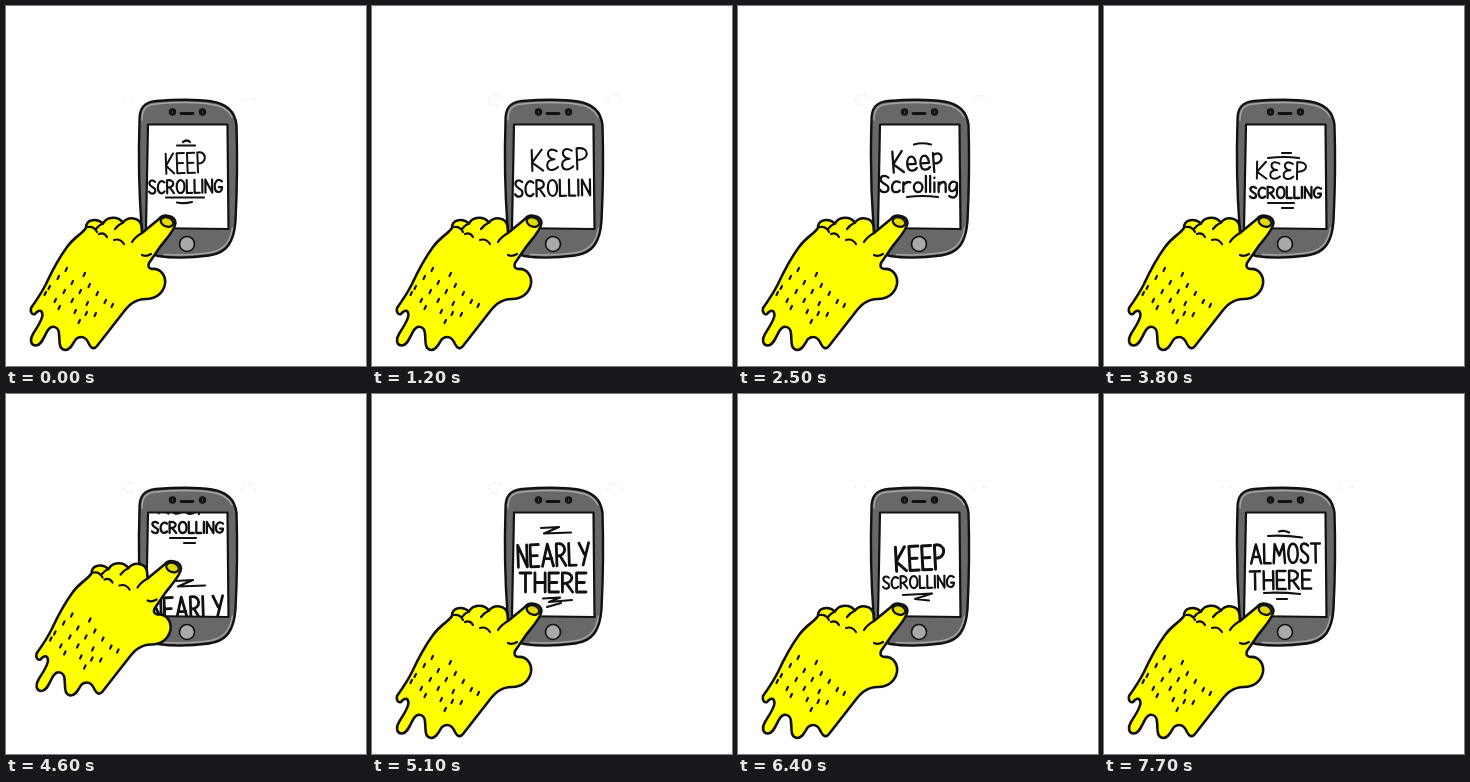
Animation of 360 by 360 pixels, one loop 8000 ms. Source, as an HTML page:

```html
<!DOCTYPE html>
<html lang="en">
<head>
<meta charset="utf-8">
<title>Keep scrolling</title>
<style>
  html, body { margin: 0; width: 100%; height: 100%; overflow: hidden; background: #fff; }
  svg { display: block; width: 100%; height: 100%; }
  .ink { fill: none; stroke: #111; stroke-width: 2.2; stroke-linecap: round; stroke-linejoin: round; }
  .ink path { vector-effect: non-scaling-stroke; }
  .specks { fill: none; stroke: #d0d0d0; stroke-width: 1; stroke-dasharray: 1 2; }
</style>
</head>
<body>
<svg viewBox="0 0 360 360" role="img" aria-label="A yellow hand scrolling on a phone">
  <defs>
    <clipPath id="glass"><path d="M142 118.500L221.500 118.500L222.500 223L140 222Z"/></clipPath>
  </defs>

  <g class="specks">
    <path id="arcs" d="M129 91A6.500 5 0 1 0 127 98M236 95A6.500 5 0 1 1 248 97"/>
    <path id="bits" d="M117 93h3M126 93h3M236 94h3M245 93h4"/>
  </g>

  <g class="ink">
    <path fill="#686868" stroke-width="2.400" d="M133.500 115C133 102 138 96 150 95C170 93.500 193 93.500 206 95.500C222 98 229 106 230.500 119C231.500 150 231 185 229.500 215C228 236 221 247 203 249.500C185 252 165 252 152 250C141 247 136 236 135.500 220C132.500 180 132.500 145 133.500 115Z"/>
    <path stroke="#a9a5a5" stroke-width="1.400" d="M136 114C136 103 140 99 150 98C172 96 192 96 206 98.500C217 100 223 104 226 111M158 248.500C173 249.500 187 249 202 247C216 245 224 238 226.500 222"/>
    <path fill="#fff" d="M142 118.500L221.500 118.500L222.500 223L140 222Z"/>
    <path stroke-width="2.800" d="M175 107.500h12"/>
    <circle cx="166.500" cy="106" r="2.600" fill="#999"/>
    <circle cx="196.500" cy="106" r="2.600" fill="#999"/>
    <circle cx="166.500" cy="106" r=".6"/>
    <circle cx="196.500" cy="106" r=".6"/>
    <circle cx="181" cy="238" r="7.500" fill="#a9a9a9" stroke-width="1.600"/>
  </g>

  <g clip-path="url(#glass)"><g id="feed" class="ink"></g></g>

  <g id="hand" class="ink">
    <path fill="#ff0" stroke-width="2.600" d="M80 222C80 213 91 212 97 217.500C101 210 112 210 117 216.500C122 210 134 211 135.500 220L136 227
      L153 213C157 207.500 169 209 169.500 217C169 224 160 233 154 241L143 257Q141 262 146 263C155 262 160 270 159 278C157 288 149 293 140 293
      C128 293 122 300 116 308L91 340C88 344 85 342 83 338C80 331 75 329 70 333C67 337 65 344 59 344
      C52 343 54 335 53 328C53 321 46 318 42 324C38 330 36 339 30 339.500C24 339 24 333 27 328C31 321 36 315 36.500 309C36 303 32 304 29 308
      C26 309 24 306 25 302C30 295 36 286 40 278C46 265 53 252 61 241C68 231 75 229 80 222Z"/>
    <path d="M97 217.500Q93 219 90 223M117 216.500Q112 219 109 223M136 227Q129 231 126 236M82 221Q88 220 91 226M93 228Q98 226 101 231M108 234Q114 232 118 238M136 249Q140 251 145 248"/>
    <ellipse cx="161" cy="216" rx="6.500" ry="4.600" fill="#e3d900" transform="rotate(20 161 216)"/>
    <path id="hairs"/>
  </g>
</svg>
<script>
const $ = id => document.getElementById(id);

// Pen strokes in a box ten units high: [width, path]. "3" is a curly E.
const glyphs = {
  A: [8, 'M0 10L4 0L8 10M1.5 6.500H7'],
  C: [6.5, 'M6.500 1.500C3 -1 0 2 0 5.500C0 10 4 11 6.500 8.500'],
  E: [6, 'M6 0H0V10H6M0 5H5'],
  3: [6.5, 'M6 1C2 -1 0 1 1 3.200Q2 4.800 4.500 4.800Q0 5 0 7.500C0 10.500 4 10.500 6.500 8.500'],
  G: [7, 'M7 1.500C3 -1.500 0 2 0 5.500C0 11 7 11 7 6H4'],
  H: [6.5, 'M0 0V10M6.500 0V10M0 5H6.500'],
  I: [.5, 'M0 0V10'],
  K: [6.5, 'M0 0V10M6 0L0 6L6.500 10'],
  L: [5, 'M0 0V10H5'],
  M: [9, 'M0 10L1 0L4.500 6L8 0L9 10'],
  N: [6.5, 'M0 10V0L6.500 10V0'],
  O: [7.5, 'M4 0C-1 0 -1 10 4 10C9 10 9 0 4 0Z'],
  P: [6, 'M0 10V0C8 -1 8 6 0 5.500'],
  R: [6.5, 'M0 10V0C8 -1 8 6 0 5.500M2.500 5.500L6.500 10'],
  S: [6, 'M6 1C3 -1 0 0 .5 2.500C1 5 6 5 6 7.500C6 11 1 10.500 0 8.500'],
  T: [7, 'M0 0H7M3.500 0V10'],
  Y: [7, 'M0 0L3.500 5M7 0L2.500 10'],
  e: [6, 'M.5 6.500H5.500C5.500 1.500 0 2 0 6.500C0 10.500 4.500 10 6 8.500'],
  p: [5.5, 'M0 2V11M0 3C6 0 8 7.500 0 7'],
  c: [5.5, 'M5.500 4C2 2 0 5 0 7C0 11 4 10.500 5.500 9'],
  r: [5, 'M0 4V10M0 6Q2 3 5 4'],
  o: [6, 'M3 4C-1 4 -1 10 3 10C7 10 7 4 3 4Z'],
  l: [.5, 'M0 0V10'],
  i: [.5, 'M0 4V10M0 1V1.300'],
  n: [5, 'M0 4V10M0 6C2 3 5 3 5 6V10'],
  g: [5.5, 'M5.500 4.500C2 2 0 5 0 7C0 11 5 10 5.500 5V10C5.500 14 2 14 0 12.500']
};

// Words: [letters, left, right, top, bottom, pen, tilt]
const screens = [
  { words: [['KEEP', 160, 199, 147, 167, 2, -2], ['SCROLLING', 143, 216, 174, 187, 2.2, -1]],
    lines: 'M171 139.500H189M177 136Q181 133 184 136M160 191.500H198M171 196.500Q178 198 186 196' },
  { words: [['K33P', 160, 215, 143, 164, 2.1, -2], ['SCROLLIN', 143, 218, 174, 190, 2.2, -1]], lines: '' },
  { words: [['Keep', 155, 204, 144, 165, 2.3, -4], ['Scrolling', 142, 219, 170, 186, 2.3, 0]],
    lines: 'M176 138.500Q184 136 193 138.500M169 191Q184 189 200 191' },
  { words: [['K33P', 153, 202, 156, 173, 2, 1], ['SCROLLING', 146, 217, 181, 192, 2.3, 0]],
    lines: 'M178 147H187M164 152Q180 150 195 152M164 197H190M178 202H189' },
  { words: [['NEARLY', 146, 217, 150, 172, 2.8, -2], ['THERE', 148, 214, 179, 198, 2.8, 0]],
    lines: 'M169 134L187 133L172 139.500L199 138.500M171 204.500L188 203.500L177 208L200 206M175 213L189 209' },
  { words: [['KEEP', 158, 206, 152, 176, 3, -3], ['SCROLLING', 145, 216, 182, 194, 2.1, -1]],
    lines: 'M165 201L194 199.500L177 205L191 206.500' },
  { words: [['ALMOST', 147, 216, 150, 169, 2.5, -1], ['THERE', 146, 207, 177, 195, 2.5, -1]],
    lines: 'M175 137.500Q180 136 185 138.500M164 142Q180 141 198 143.500M160 199Q177 198 196 200M173 205H183' }
];

const gap = 2.5, pitch = 106;

function drawWord([text, x0, x1, y0, y1, pen, tilt]) {
  const size = [...text].reduce((sum, c) => sum + glyphs[c][0] + gap, -gap);
  const sx = (x1 - x0) / size, sy = (y1 - y0) / 10;
  let x = x0;
  const letters = [...text].map(c => {
    const [w, d] = glyphs[c];
    const out = `<path transform="translate(${x} ${y0}) scale(${sx} ${sy})" d="${d}"/>`;
    x += (w + gap) * sx;
    return out;
  }).join('');
  return `<g stroke-width="${pen}" transform="rotate(${tilt} ${(x0 + x1) / 2} ${(y0 + y1) / 2})">${letters}</g>`;
}

$('feed').innerHTML = screens.map(({ words, lines }, i) => {
  const label = words.map(w => w[0].replace(/3/g, 'E')).join(' ');
  return `<g aria-label="${label}" transform="translate(0 ${i * pitch})">${words.map(drawWord).join('')}<path d="${lines}"/></g>`;
}).join('');

const hairs = [[61, 262], [79, 267], [53, 270], [67, 275], [84, 278], [44, 280], [59, 284], [75, 284], [92, 286],
  [50, 293], [67, 293], [82, 296], [100, 294], [40, 286], [54, 300], [70, 304], [107, 298], [90, 307], [81, 306], [74, 314]];
$('hairs').setAttribute('d', hairs.map(([x, y]) => `M${x} ${y}l-1.500 3`).join(''));

const loop = 8000, rest = 500, beat = 1300, tick = 100, ticks = 8;
const ease = p => p * p * (3 - 2 * p);

function draw(now) {
  const t = now % loop - rest;
  const swipe = Math.max(0, Math.floor(t / beat));
  const k = t < 0 ? 0 : Math.min(ticks, Math.floor((t - swipe * beat) / tick) + 1);
  const pos = swipe + ease(Math.min(1, k / 6));
  const lift = Math.sin(Math.PI * k / ticks);
  $('feed').setAttribute('transform', `translate(0 ${-pos * pitch})`);
  $('hand').setAttribute('transform', `translate(${6 * lift} ${-46 * lift})`);
  const shown = Math.round(pos);
  $('arcs').style.display = [1, 2, 4].includes(shown) ? '' : 'none';
  $('bits').style.display = [0, 5, 6].includes(shown) ? '' : 'none';
  requestAnimationFrame(draw);
}
draw(0);
</script>
</body>
</html>
```
